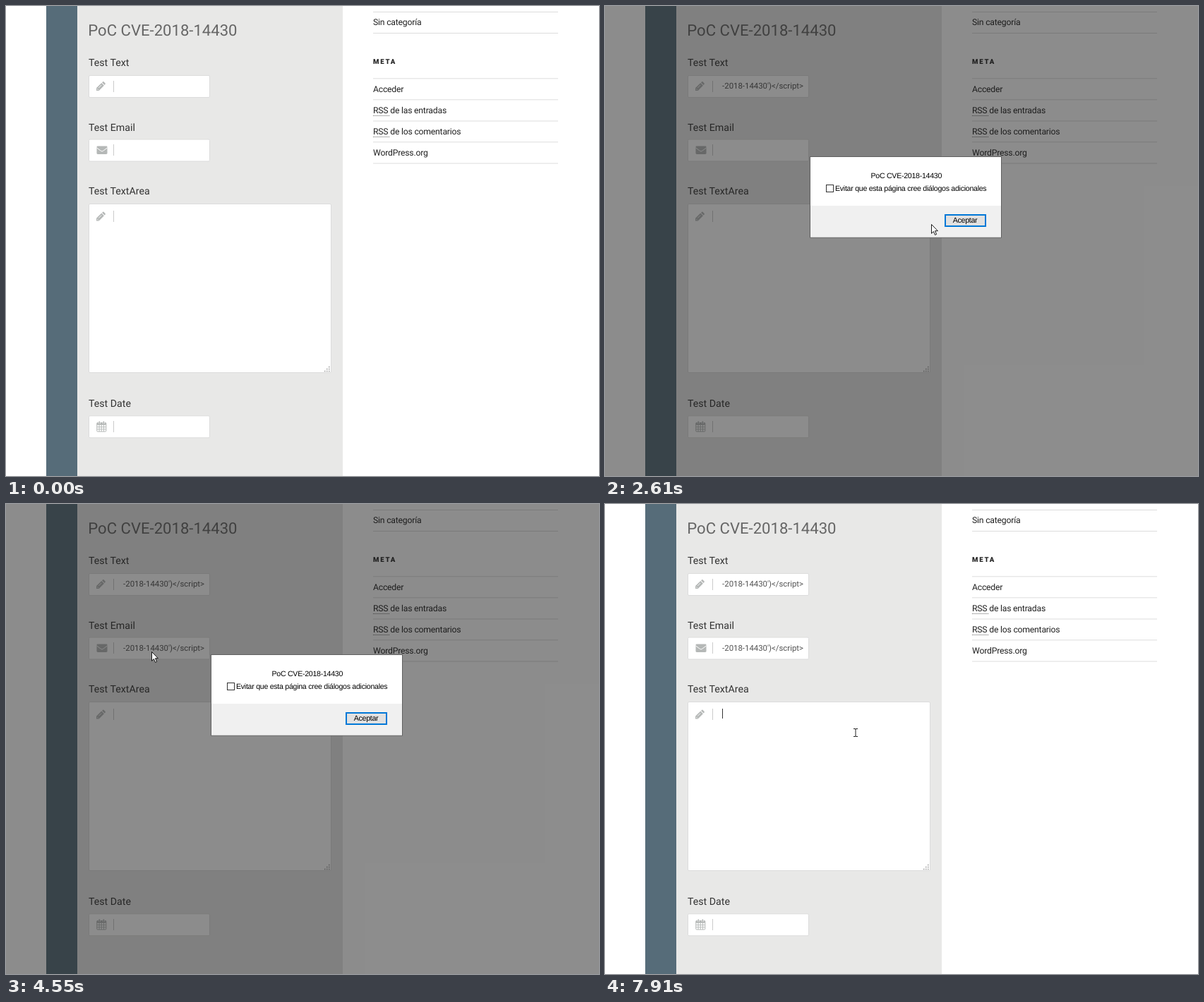
Recreate the animation shown at these times as an HTML page. Size 840x666 px, loop 7990 ms.

```html
<!DOCTYPE html>
<html lang="es">
<head>
<meta charset="utf-8">
<title>Form demo</title>
<style>
html, body { margin: 0; width: 100%; height: 100%; overflow: hidden; background: #fff; }
svg { display: block; }
text { font-family: Roboto, "Open Sans", sans-serif; fill: #333; white-space: pre; text-rendering: geometricPrecision; }
.title { font-size: 22.1px; fill: #666; }
.label { font-size: 14.2px; }
.side text { font-size: 12.2px; letter-spacing: -.2px; fill: #222; }
.side .head { font-size: 9.6px; font-weight: 800; letter-spacing: 1.8px; }
.value { font-size: 11.4px; fill: #555; text-anchor: end; }
.box { fill: #fff; stroke: #dcdcdc; }
.sep { stroke: #ccc; }
.dlg text { font-family: "Liberation Sans", Arial, sans-serif; font-size: 10.6px; letter-spacing: -.27px; fill: #000; }
.dlg .mid { text-anchor: middle; }
</style>
</head>
<body>
<svg width="840" height="666" viewBox="0 0 840 666">
  <defs>
    <clipPath id="clipIn"><rect x="166" y="90" width="120" height="130"/></clipPath>
    <g id="pencil" fill="#b5b8b7">
      <path d="M0 13V9.3L7.3 2.1 10.9 5.7 3.6 13Z"/>
      <path d="M8.1 1.4 9.2.3q.6-.5 1.2 0L12.6 2.5q.5.6 0 1.2L11.6 4.9Z"/>
      <path d="M1.1 10.3 2.7 11.9M3.2 9 7.2 5" stroke="#fff" stroke-width=".9"/>
    </g>
    <g id="mail">
      <rect width="15" height="11.5" rx="1.4" fill="#b5b8b7"/>
      <path d="M0 2.4 6 6.9q1.5 1 3 0L15 2.4" fill="none" stroke="#fff"/>
    </g>
    <g id="calendar" fill="none" stroke="#b5b8b7">
      <rect x=".5" y="2.5" width="13" height="12.5" rx="1"/>
      <path d="M.5 4.2H13.5" stroke-width="3"/>
      <path d="M.5 8.5H13.5M.5 11.7H13.5M3.8 5V15M7 5V15M10.2 5V15" stroke-width=".9"/>
      <path d="M4 .5V4M10 .5V4" stroke="#fff" stroke-width="3"/>
      <path d="M4 .5V4M10 .5V4" stroke-width="1.8"/>
    </g>
  </defs>

  <rect width="840" height="666" fill="#fff"/>
  <rect x="57" width="44" height="666" fill="#566c79"/>
  <rect x="101" width="376" height="666" fill="#e8e8e7"/>

  <text class="title" x="116.3" y="42">PoC CVE-2018-14430</text>
  <g id="form"></g>
  <use href="#pencil" x="128" y="107"/>
  <use href="#mail" x="128.5" y="198.5"/>
  <use href="#pencil" x="128" y="291.5"/>
  <use href="#calendar" x="128.3" y="588"/>
  <path d="M457 511.5h1.5M454 514.5h1.5M457 514.5h1.5M451 517.5h1.5M454 517.5h1.5M457 517.5h1.5" stroke="#999" stroke-width="1.5"/>

  <g clip-path="url(#clipIn)">
    <text class="value" id="val1" x="281" y="117">&lt;script&gt;alert('PoC CVE-2018-14430')&lt;/script&gt;</text>
    <text class="value" id="val2" x="281" y="208">&lt;script&gt;alert('PoC CVE-2018-14430')&lt;/script&gt;</text>
  </g>
  <rect id="caret" width="1" height="14" fill="#333"/>

  <g class="side">
    <path d="M520 8.5H782M520 38.5H782M520 102.8H782M520 132.8H782M520 163H782M520 192.8H782M520 223H782" stroke="#ddd"/>
    <path d="M520 155.5H543M520 185.5H543" stroke="#666" stroke-dasharray="1 1"/>
    <text x="520" y="27">Sin categoría</text>
    <text x="520" y="82" class="head">META</text>
    <text x="520" y="122">Acceder</text>
    <text x="520" y="152">RSS de las entradas</text>
    <text x="520" y="182">RSS de los comentarios</text>
    <text x="520" y="212">WordPress.org</text>
  </g>

  <g id="modal" class="dlg">
    <rect width="840" height="666" fill="#1a1a1a" fill-opacity=".5"/>
    <rect id="frame" y="213.5" height="114.5" fill="#fff" stroke="#606060"/>
    <rect id="foot" y="283" height="44.5" fill="#f0f0f0"/>
    <text id="msg" x="376.5">PoC CVE-2018-14430</text>
    <g id="check">
      <rect x="313.5" y="253.5" width="10" height="10" fill="#fff" stroke="#333"/>
      <text x="326" y="262">Evitar que esta página cree diálogos adicionales</text>
    </g>
    <rect id="btn"/>
    <text id="ok" class="mid" y="307">Aceptar</text>
  </g>

  <g id="cursor">
    <path id="arrow" d="M.5.5V13.3L3.4 10.5 5.5 15.4 7.6 14.5 5.5 9.7H9.4Z" fill="#fff" stroke="#000" stroke-width=".9"/>
    <path id="beam" d="M-3-5.5H-1L0-5 1-5.5H3M0-5V5M-3 5.5H-1L0 5 1 5.5H3" fill="none" stroke="#222"/>
  </g>
</svg>
<script>
const LOOP = 7990;
const $ = id => document.getElementById(id);
const set = (el, attrs) => { for (const k in attrs) el.setAttribute(k, attrs[k]); };
const show = (el, on) => { el.style.display = on ? "" : "none"; };

// label, label baseline, box top, width, height, separator top
const fields = [
  ["Test Text", 85, 98, 171, 31, 106],
  ["Test Email", 176.5, 188.5, 171, 31, 196],
  ["Test TextArea", 267, 280, 343, 239, 290],
  ["Test Date", 567.5, 580.3, 171, 31, 588]
];
$("form").innerHTML = fields.map(([name, base, top, w, h, sep]) =>
  `<text class="label" x="117" y="${base}">${name}</text>
   <rect class="box" x="117.5" y="${top + .5}" width="${w}" height="${h}" rx="1.5"/>
   <path class="sep" d="M152.5 ${sep}v16"/>`).join("");

// first step, last step, step count, destination
const moves = [
  [70, 600, 8, 218, 117],
  [1750, 2210, 7, 458, 306],
  [2610, 2610, 1, 462, 309],
  [2690, 2920, 4, 505, 308],
  [3070, 3230, 3, 487, 305],
  [3390, 4080, 10, 206, 209],
  [4780, 5400, 9, 498, 296],
  [5560, 5950, 6, 506, 302],
  [7590, 7910, 5, 355, 324]
];
const presses = [[2360, 2610], [2840, 3070], [5720, 5950], [6250, 6420], [6720, 6890], [7210, 7280]];
// from, to, x, y
const carets = [
  [840, 1370, 166, 106],
  [1520, 1610, 281, 106.5],
  [3070, 3620, 281, 106.5],
  [4080, 4550, 166, 197],
  [7280, 7590, 281, 197.5],
  [7910, LOOP, 166, 290]
];
const within = (t, [a, b]) => t >= a && t < b;
const ease = p => p * p * (3 - 2 * p);

function pointer(t) {
  let x = 617, y = 484;
  for (const [a, b, n, tx, ty] of moves) {
    if (t < a) break;
    const step = n > 1 ? (b - a) / (n - 1) : 1;
    const p = ease(Math.min(1, (Math.floor((t - a) / step + 1e-6) + 1) / n));
    x += (tx - x) * p;
    y += (ty - y) * p;
  }
  return [x, y];
}

function drawDialog(t, x, y) {
  const first = within(t, [1520, 2610]);
  const open = first || within(t, [2610, 3070]) || within(t, [4550, 7280]);
  show($("modal"), open);
  if (!open) return false;
  const left = first ? 330 : 291, width = first ? 191 : 270;
  const bx = first ? 441 : 481;
  set($("frame"), { x: left - .5, width: width + 1 });
  set($("foot"), { x: left, width });
  set($("msg"), { y: first ? 252 : 244 });
  show($("check"), !first);
  const down = presses.some(p => within(t, p));
  const over = x >= bx && x <= bx + 59 && y >= 295 && y <= 313;
  const line = down || over ? 1 : 2;
  set($("btn"), {
    x: bx + line / 2, y: 295 + line / 2, width: 59 - line, height: 18 - line,
    fill: down ? "#cce4f7" : over ? "#e5f1fb" : "#e1e1e1",
    stroke: down ? "#005499" : "#0078d7", "stroke-width": line
  });
  set($("ok"), { x: bx + 29 });
  return true;
}

function draw(t) {
  const [x, y] = pointer(t);
  const open = drawDialog(t, x, y);
  show($("val1"), t >= 1520);
  show($("val2"), t >= 4550);

  const caret = carets.find(c => within(t, c));
  show($("caret"), caret);
  if (caret) set($("caret"), { x: caret[2], y: caret[3] });

  const typing = !open && fields.some(([, , top, w, h]) =>
    x > 117 && x < 117 + w && y > top && y < top + h);
  show($("cursor"), t >= 70);
  show($("beam"), typing);
  show($("arrow"), !typing);
  set($("cursor"), { transform: `translate(${Math.round(x)} ${Math.round(y)})` });
}

const start = performance.now();
function tick() {
  draw((performance.now() - start) % LOOP);
  requestAnimationFrame(tick);
}
tick();
</script>
</body>
</html>
```
